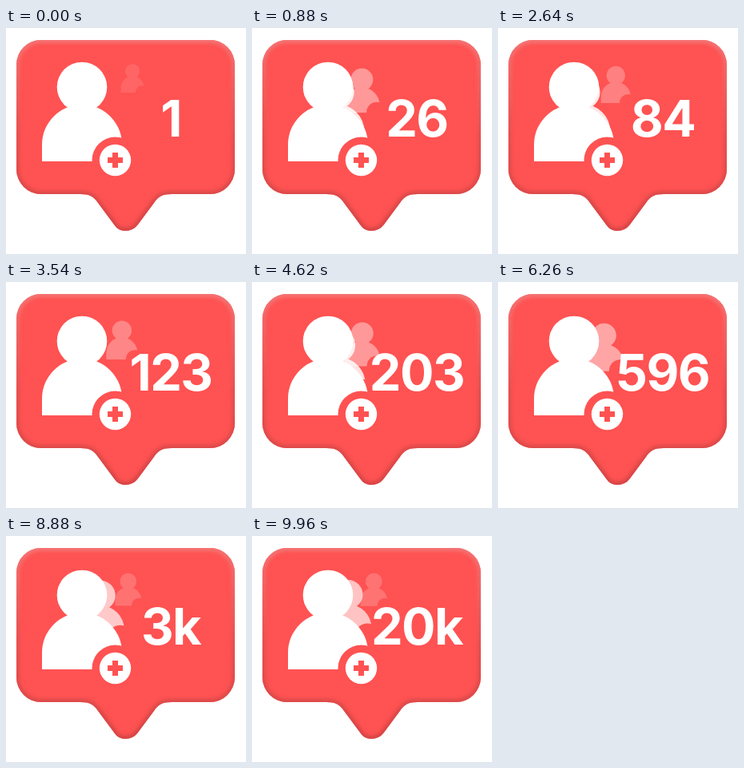
Write an HTML page that moves like this. It is 300 px wide and 283 px high and loops after 9980 ms.

```html
<!DOCTYPE html>
<html lang="en">
<head>
<meta charset="utf-8">
<title>Follower counter</title>
<style>
html, body { margin: 0; width: 100%; height: 100%; overflow: hidden; background: #fff; }
svg { display: block; width: 100%; height: 100%; }
text { font: 700 63px Inter, "Open Sans", sans-serif; letter-spacing: -1.5px; fill: #fff; }
</style>
</head>
<body>
<svg viewBox="0 0 300 283">
  <defs>
    <path id="bubble" d="M44 15H255A31 31 0 0 1 286 46V177A31 31 0 0 1 255 208H207C196 208 190 211 185 219L165 246Q159 254 149 254Q140 254 135 246L115 219C110 211 104 208 93 208H44A31 31 0 0 1 13 177V46A31 31 0 0 1 44 15Z"/>
    <clipPath id="inside"><use href="#bubble"/></clipPath>
    <filter id="soft" x="-10%" y="-10%" width="120%" height="120%"><feGaussianBlur stdDeviation="2"/></filter>
    <linearGradient id="rim" x1="0" y1="0" x2="0" y2="1">
      <stop offset="0" stop-color="#f47474"/>
      <stop offset=".5" stop-color="#e45050"/>
      <stop offset="1" stop-color="#d64444"/>
    </linearGradient>
    <!-- person with the head centre at 0,0 -->
    <g id="person">
      <circle r="31.3"/>
      <path d="M-50 93V72A50 50 0 0 1 50 72V93Z"/>
    </g>
    <mask id="notch" maskUnits="userSpaceOnUse" x="-60" y="-40" width="130" height="140">
      <path fill="#fff" d="M-60-40H70V100H-60Z"/>
      <circle cx="41.5" cy="91.5" r="28.5"/>
    </mask>
    <g id="notched"><use href="#person" mask="url(#notch)"/></g>
  </defs>

  <use href="#bubble" fill="#ff5252"/>
  <g clip-path="url(#inside)">
    <use href="#bubble" fill="none" stroke="url(#rim)" stroke-width="8" filter="url(#soft)"/>
  </g>

  <g id="ghosts" fill="#fff"></g>
  <use href="#person" x="95" y="74" fill="#fff"/>
  <circle cx="136.5" cy="165.5" r="29" fill="#ff5252"/>
  <circle cx="136.5" cy="165.5" r="19.7" fill="#fff"/>
  <path d="M136.5 156V175M127 165.5H146" stroke="#ff5252" stroke-width="7"/>
  <text id="count" x="206" y="136" text-anchor="middle"></text>
</svg>
<script>
const LOOP = 9980, LIFE = 585;

// [start of a run, number of evenly spaced ghosts until the next run]
const runs = [[-20, 4], [1300, 1], [1631, 4], [3380, 2], [4070, 1], [4385, 5],
              [5970, 4], [7370, 1], [7700, 5], [9540, 1], [9880, 1], [LOOP, 0]];
const births = runs.flatMap(([start, n], i) =>
  Array.from({ length: n }, (_, k) => start + (runs[i + 1][0] - start) * k / n));

// [time, followers]
const growth = [[0, 1], [1720, 51], [3000, 98], [3540, 123], [4620, 203],
                [6260, 596], [7800, 857], [8700, 1000], [9900, 20000], [LOOP, 20000]];

const layer = document.getElementById("ghosts");
const label = document.getElementById("count");

function addGhost() {
  const el = document.createElementNS("http://www.w3.org/2000/svg", "use");
  el.setAttribute("href", "#notched");
  return layer.appendChild(el);
}
const pool = [0, 1, 2].map(addGhost);

function followers(t) {
  const i = growth.findIndex(p => p[0] > t);
  const [t0, a] = growth[i - 1], [t1, b] = growth[i];
  const n = Math.floor(a + (b - a) * (t - t0) / (t1 - t0) + 1e-6);
  return n < 1000 ? String(n) : Math.floor(n / 1000) + "k";
}

function placeGhost(el, u) {
  const x = 160 - 55 * u, y = 53 + 28 * u, scale = (8.5 + 13 * u) / 31;
  el.setAttribute("transform", `translate(${x} ${y}) scale(${scale})`);
  el.setAttribute("opacity", 0.08 + 0.8 * u);
}

function render(t) {
  // the oldest ghost lies on top
  const ages = births.map(b => (t - b) / LIFE).filter(u => u >= 0 && u < 1).sort((a, b) => a - b);
  pool.forEach((el, i) => {
    el.style.display = i < ages.length ? "" : "none";
    if (i < ages.length) placeGhost(el, ages[i]);
  });
  label.textContent = followers(t);
}

function tick() {
  render(performance.now() % LOOP);
  requestAnimationFrame(tick);
}
tick();
</script>
</body>
</html>
```
